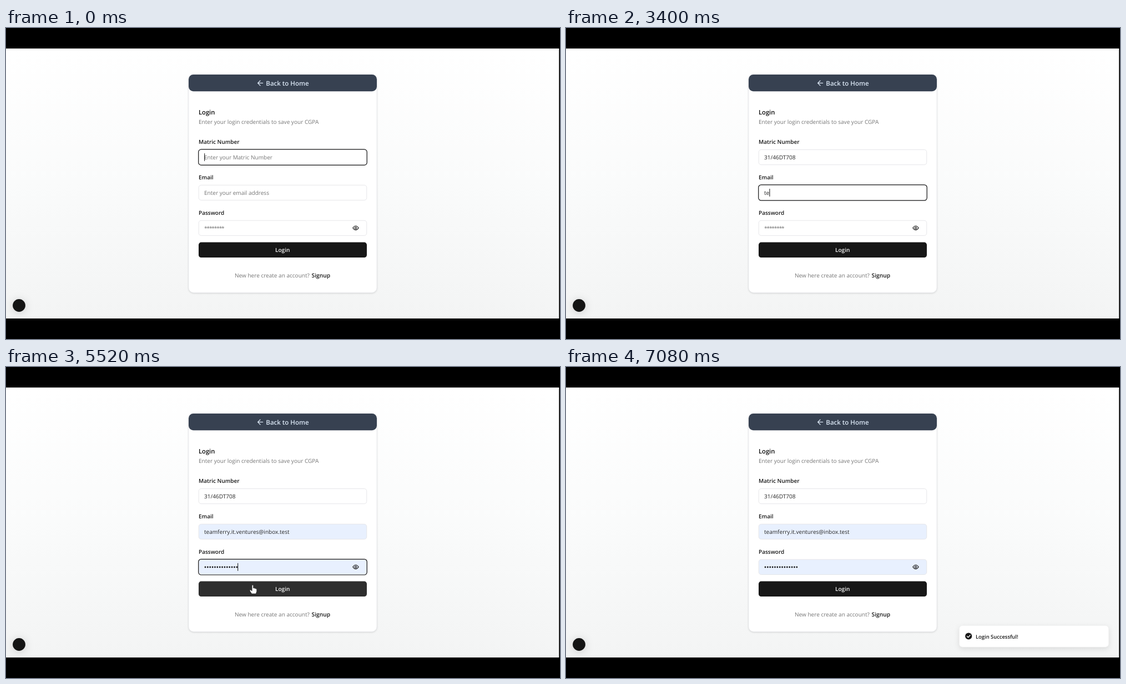
Animation, 998 px wide and 561 px high, one loop 7.52 s. Source, as an HTML page:

```html
<!DOCTYPE html>
<html lang="en">
<head>
<meta charset="utf-8">
<title>Login form</title>
<style>
  html, body { margin: 0; width: 100%; height: 100%; overflow: hidden; background: #000; }
  svg { display: block; width: 100vw; height: 100vh; }
  text { font: 10.05px "Open Sans", "Noto Sans", sans-serif; fill: #262626; text-rendering: geometricPrecision; white-space: pre; }
  .bold { font-weight: 600; font-size: 10px; fill: #171717; }
  .muted { fill: #757575; }
  .preview { font-family: "Liberation Sans", Arial, sans-serif; font-size: 10.1px; fill: #111; }
  .mid { text-anchor: middle; }
  .line { fill: none; stroke-linecap: round; stroke-linejoin: round; }
  .card { filter: drop-shadow(0 1px 1.5px rgba(0, 0, 0, .13)); }
  .toast { filter: drop-shadow(0 3px 5px rgba(0, 0, 0, .1)); }
  .badge { filter: drop-shadow(0 2px 8px rgba(0, 0, 0, .16)); }
</style>
</head>
<body>
<svg viewBox="0 0 998 561">
  <defs>
    <linearGradient id="sky" x2="0" y2="1">
      <stop stop-color="#fff"/>
      <stop offset=".5" stop-color="#fafbfb"/>
      <stop offset="1" stop-color="#f3f4f4"/>
    </linearGradient>
  </defs>
  <rect width="998" height="561"/>
  <rect y="37" width="996.5" height="487" fill="url(#sky)"/>

  <rect class="card" x="329" y="84" width="339" height="393.5" rx="9" fill="#fff" stroke="#e5e7eb" stroke-width=".7"/>
  <rect x="329" y="84" width="339" height="30.3" rx="8.5" fill="#374151"/>
  <path class="line" d="M462.6 99.4H453.6M458 95l-4.4 4.4 4.4 4.4" stroke="#dbe7f5" stroke-width="1.3"/>
  <text class="bold" x="468.3" y="103.7" style="font-size:11.5px;fill:#dbe7f5">Back to Home</text>
  <text class="bold" x="347" y="155.5" style="font-size:11.2px;fill:#0a0a0a">Login</text>
  <text class="muted" x="347" y="173.2">Enter your login credentials to save your CGPA</text>

  <g id="fields"></g>
  <path id="dots" class="line" stroke="#171717"/>
  <g class="line" stroke="#262626" stroke-width="1.15">
    <path d="M624.8 360.7q5.2-7.4 10.4 0q-5.2 7.4-10.4 0z"/>
    <circle cx="630" cy="360.7" r="1.6"/>
  </g>
  <rect id="caret" width="1" height="14" fill="#111"/>

  <rect id="button" x="347" y="386.6" width="303" height="27.4" rx="4.6"/>
  <text id="action" class="bold mid" x="498.2" y="404.2" style="fill:#fafafa"></text>
  <text class="muted" x="412" y="450">New here create an account?</text>
  <text class="bold" x="550.5" y="450" style="font-size:10.25px">Signup</text>

  <circle class="badge" cx="23.5" cy="500.5" r="11.4" fill="#141414"/>

  <g id="toast">
    <rect class="toast" x="708.3" y="466.3" width="269.4" height="39" rx="6" fill="#fff" stroke="#ececec" stroke-width=".7"/>
    <circle cx="725.2" cy="485.5" r="6.1" fill="#171717"/>
    <path class="line" d="M722.5 485.7l2 2 3.6-3.9" stroke="#fff" stroke-width="1.3"/>
    <text class="bold" x="738" y="490" style="font-size:9.4px">Login Successful!</text>
  </g>

  <path id="arrow" d="M0 0V11.6l2.7-2.5 1.8 4.2 2-.9-1.8-4h3.7z" fill="#fff" stroke="#333" stroke-width=".8"/>
  <path id="hand" d="M-1.2.8q1.2-1.6 2.4 0v5l1.4-.5q1 .1 1.1 1 1.5-.6 2 .6 1.6-.3 1.7 1.2v3.4l-1.5 4.3H-1.6L-4.8 11q-.9-2.6.9-2.2l2.7 2z" fill="#fff" stroke="#333" stroke-width=".7"/>
  <path d="M0 524H998V561H0zM996.5 0H998V561h-1.5z"/>
</svg>
<script>
const LOOP = 7520, STEP = 40;
const MATRIC = "31/46DT708";
const FIRST = "thequietmountainhare@inbox.test";
const SECOND = "teamferry.it.ventures@inbox.test";
const BLUE = "#e8f0fe";

// Each table holds [start time, value...] rows
const typed = [[0, 0], [40, 1], [120, 2], [400, 3], [640, 4], [720, 5],
  [1320, 6], [1560, 7], [1880, 8], [2080, 9], [2320, 10]];
const emails = [[0, ""], [3280, "t"], [3400, "te"], [4400, FIRST], [4960, SECOND]];
const focus = [[0, 0], [2600, 1], [4400, 2], [5960, -1]];
const caretOn = [[0, 1], [1040, 0], [1320, 1], [3000, 0], [3280, 1],
  [3720, 0], [3960, 1], [4400, 0], [5320, 1], [5960, 0]];
const path = [[3960, 440, 438], [4200, 416, 390], [4440, 403, 354], [4640, 402, 346],
  [4760, 402, 346], [4840, 402.5, 347.8], [5080, 424, 360], [5320, 424, 360],
  [5400, 437, 388], [5520, 444.3, 393.2], [5760, 459, 396], [6040, 468.4, 397], [6920, 468.4, 397]];

const $ = id => document.getElementById(id);
const set = (el, attrs) => { for (const k in attrs) el.setAttribute(k, attrs[k]); };
const show = (el, on) => set(el, { visibility: on ? "visible" : "hidden" });
const ramp = (t, a, b) => Math.min(1, Math.max(0, (t - a) / (b - a)));
const valueAt = (rows, t) => rows.filter(r => r[0] <= t).pop()[1];

function add(tag, attrs, text = "") {
  const el = document.createElementNS("http://www.w3.org/2000/svg", tag);
  set(el, attrs);
  el.textContent = text;
  return $("fields").appendChild(el);
}

function makeField(label, hint, top, spacing = 0) {
  add("text", { class: "bold", x: 347, y: top - 10.4 }, label);
  const box = { x: 347.2, y: top + .2, width: 302.6, height: 27.2, rx: 4.4 };
  return {
    top, hint,
    box: add("rect", { ...box, stroke: "#e4e4e7", "stroke-width": .9 }),
    ring: add("rect", { x: 346.7, y: top - .4, width: 303.6, height: 28.4, rx: 4.9,
      fill: "none", stroke: "#1a1a1a", "stroke-width": 1.2 }),
    text: add("text", { x: 357, y: top + 17.7, "letter-spacing": spacing })
  };
}

const fields = [
  makeField("Matric Number", "Enter your Matric Number", 219.3),
  makeField("Email", "Enter your email address", 283.2),
  makeField("Password", "********", 347, -1.1)
];

function fill(field, value, look, color) {
  field.text.textContent = value || field.hint;
  set(field.text, { class: value ? look : "muted" });
  set(field.box, { fill: color });
}

function cursorAt(t) {
  const i = path.findIndex(p => p[0] > t);
  if (i < 1) return null;
  const [t0, x0, y0] = path[i - 1], [t1, x1, y1] = path[i];
  const k = ramp(t, t0, t1);
  return [x0 + (x1 - x0) * k, y0 + (y1 - y0) * k];
}

function drawFields(t) {
  const preview = t >= 4400 && t < 5320, filled = t >= 4400;
  const email = valueAt(emails, t);
  fill(fields[0], MATRIC.slice(0, valueAt(typed, t)), "", "#fff");
  fill(fields[1], email, preview ? "preview" : "", filled ? BLUE : "#fff");
  fill(fields[2], "", "", t >= 4880 ? BLUE : "#fff");
  show(fields[2].text, !filled);

  const gap = preview ? 3.6 : 4.37;
  show($("dots"), filled);
  set($("dots"), { d: `M359 361h${13 * gap + .1}`, "stroke-dasharray": `0 ${gap}`,
    "stroke-width": preview ? 2.3 : 2.8 });

  const active = valueAt(focus, t);
  const swap = ramp(t, 2560, 2680);
  fields.forEach((f, i) => set(f.ring, { opacity:
    t >= 2600 && t < 2680 && i < 2 ? (i ? swap : 1 - swap) : +(i === active) }));

  show($("caret"), valueAt(caretOn, t) && active >= 0);
  if (active < 0) return;
  const f = fields[active];
  const empty = active === 2 ? false : f.text.textContent === f.hint;
  const width = active === 2 ? 60 : empty ? 0 : f.text.getComputedTextLength();
  set($("caret"), { x: 357 + width + .2, y: f.top + 6.8 });
}

function drawButton(t) {
  const loading = t >= 5960 && t < 6360;
  const hover = ramp(t, 5400, 5520) * (1 - ramp(t, 6880, 7080));
  const shade = loading ? 139 : Math.round(23 + 23 * hover);
  set($("button"), { fill: `rgb(${shade},${shade},${shade})` });
  $("action").textContent = loading ? "Loading..." : "Login";
}

function drawCursor(t) {
  const pos = cursorAt(t);
  const hand = (t >= 5400 && t < 5960) || t >= 6360;
  for (const id of ["arrow", "hand"]) {
    show($(id), pos && (id === "hand") === hand);
    if (pos) set($(id), { transform: `translate(${pos})` });
  }
}

function drawToast(t) {
  const k = 1 - (1 - ramp(t, 6340, 6760)) ** 3;
  set($("toast"), { opacity: k, transform: `translate(0 ${39 * (1 - k)})` });
}

function draw(time) {
  const t = Math.floor(time % LOOP / STEP) * STEP;
  drawFields(t);
  drawButton(t);
  drawCursor(t);
  drawToast(t);
}

const start = performance.now();
function tick() {
  draw(performance.now() - start);
  requestAnimationFrame(tick);
}
tick();
</script>
</body>
</html>
```
